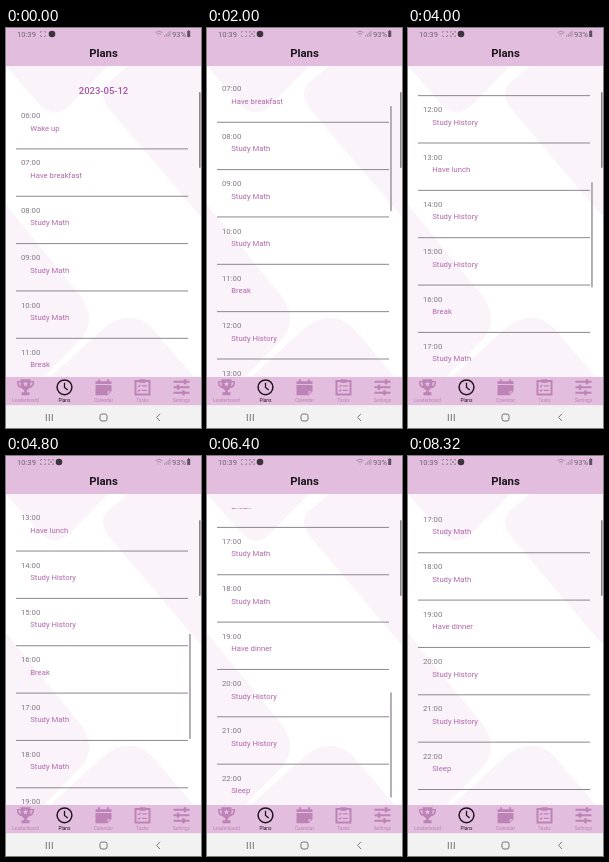
An HTML page that plays this animation: 195 by 400 pixels, repeating every 8.4 s.

```html
<!DOCTYPE html>
<html lang="en">
<head>
<meta charset="utf-8">
<title>Plans</title>
<style>
html, body { margin: 0; width: 100%; height: 100%; overflow: hidden; background: #fff; }
svg { display: block; width: 100%; height: 100%; font-family: Roboto, Arial, sans-serif; }
.bar { fill: #e2bddd; }
.blob { fill: #faf3fa; }
.time { font-size: 7.75px; fill: #807882; }
.task { font-size: 7.7px; fill: #b066a9; }
.rule { stroke: #8d868f; stroke-width: 1; }
.tab { fill: #bd83b7; stroke: none; color: #bd83b7; }
.tab.on { fill: #1c151c; color: #1c151c; }
.tab text { font-size: 4.8px; text-anchor: middle; }
.line { fill: none; stroke: currentColor; }
.status { fill: #6d6070; font-size: 7.6px; }
.thin { fill: none; stroke: #8d7a8d; stroke-width: .7; }
.nav { fill: none; stroke: #777; stroke-width: 1; }
</style>
</head>
<body>
<svg viewBox="0 0 195 400" preserveAspectRatio="none">
  <defs>
    <clipPath id="view"><rect x="0" y="52" width="195" height="297"/></clipPath>
    <clipPath id="page"><rect x="0" y="38" width="195" height="311"/></clipPath>
  </defs>
  <rect width="195" height="400" fill="#fff"/>
  <g class="blob" clip-path="url(#page)">
    <path d="M0 38H102L64 77Q49 92 34 77L0 38Z"/>
    <path d="M122 38H195V189L104 82Q90 65 104 53Z"/>
    <path d="M0 177L76 270Q90 292 76 310L38 349H0Z"/>
    <path d="M44 349L98 300Q123 280 145 299L188 349Z"/>
  </g>

  <g clip-path="url(#view)"><g id="list">
    <text x="97.5" y="65.9" text-anchor="middle" font-size="9.5" font-weight="500" fill="#a455a3">2023-05-12</text>
  </g></g>
  <rect id="thumb" x="183" y="52" width="1.9" height="105" fill="#b0abb1"/>
  <rect x="193" y="64" width="1.6" height="76" rx=".8" fill="#8a858c"/>

  <rect class="bar" width="195" height="38"/>
  <text x="97.5" y="28.6" text-anchor="middle" font-size="11.4" font-weight="700" fill="#1c151c">Plans</text>
  <text class="status" x="11" y="8.7">10:39</text>
  <g class="thin">
    <path d="M34.5 5V3.5H36M38 3.5H39.5V5M39.5 7V8.5H38M36 8.5H34.5V7"/>
    <path id="extra" d="M42.5 5V3.5H44M46 3.5H47.5V5M47.5 7V8.5H46M44 8.5H42.5V7M44 5L46 7M46 5L44 7"/>
    <path d="M149.5 4.6Q153 1.8 156.5 4.6M151 6.3Q153 4.7 155 6.3M153 7.8V8.4M158.5 8.8V7.4M160.3 8.8V5.8M162.1 8.8V4.2M163.9 8.8V2.8"/>
  </g>
  <circle id="dot" cx="46" cy="6" r="3.3" fill="#3a333a"/>
  <text class="status" x="166" y="8.7">93%</text>
  <path d="M181.2 3H182V2.2H183.4V3H184.2V9H181.2Z" fill="#5d5060"/>

  <rect class="bar" y="349" width="195" height="28.5"/>
  <g id="tabs"></g>
  <rect y="377.5" width="195" height="22.5" fill="#f2f2f2"/>
  <path class="nav" d="M40.3 386V393M43.3 386V393M46.3 386V393M154 385.8L150.6 389.4L154 393"/>
  <rect class="nav" x="94" y="386" width="7" height="7" rx="2"/>
</svg>
<script>
const $ = id => document.getElementById(id);
const LOOP = 8400, STEP = 80, ROW = 47.35, TOP = 52, VIEW = 297, MAX = 545;

const tasks = ["Wake up", "Have breakfast", "Study Math", "Study Math", "Study Math", "Break",
  "Study History", "Have lunch", "Study History", "Study History", "Break", "Study Math",
  "Study Math", "Have dinner", "Study History", "Study History", "Sleep"];

$("list").innerHTML += tasks.map((task, i) => {
  const y = 87.4 + i * ROW, hour = String(i + 6).padStart(2, "0");
  return `<text class="time" x="15" y="${y + 2.7}">${hour}:00</text>
    <text class="task" x="24.3" y="${y + 15.2}">${task}</text>
    <path class="rule" d="M10 ${y + 33.5}H182"/>`;
}).join("");

// Icons are drawn around their own centre.
const tabs = [
  ["Leaderboard", `<path d="M-5-8H5V-6.4H8.5V-4Q8 .3 3.6 1Q2.7 2.5 1.3 3V5H4V8H-4V5H-1.3V3Q-2.7 2.5-3.6 1Q-8 .3-8.5-4V-6.4H-5ZM-7-5V-4Q-6.7-1.9-4.5-1Q-5-3-5-5ZM7-5H5Q5-3 4.5-1Q6.7-1.9 7-4ZM0-6.2L-.8-4.4L-2.6-4.2L-1.3-2.9L-1.6-1L0-1.9L1.6-1L1.3-2.9L2.6-4.2L.8-4.4Z" fill-rule="evenodd"/>`],
  ["Plans", `<circle class="line" r="7.4" stroke-width="1.5"/><path class="line" d="M0-4.6V.2L3.2 2.8" stroke-width="1.3"/>`],
  ["Calendar", `<path d="M-8-6H-5.5V-8H-3.7V-6H3.7V-8H5.5V-6H8V-3.2H-8ZM-8-2.2H8V4L4.2 8H-8ZM4 4V7L7 4Z" fill-rule="evenodd"/>`],
  ["Tasks", `<path class="line" d="M-7-6.3H7V7.2H-7Z" stroke-width="2"/><path d="M-3-8H3V-4.5H-3Z"/><path class="line" d="M-4.5-1.5L-3.6-.6L-2.2-2.4M-4.5 3L-3.6 3.9L-2.2 2.1M-.8-1.4H4.5M-.8 3H4.5" stroke-width="1.2"/>`],
  ["Settings", `<path class="line" d="M-8-5.5H8M-8 0H8M-8 5.5H8" stroke-width="1.9"/><path class="line" d="M3.5-8V-3M-3.5-2.5V2.5M2 3V8" stroke-width="2.4"/>`]
];
$("tabs").innerHTML = tabs.map(([name, icon], i) =>
  `<g class="tab${i === 1 ? " on" : ""}" transform="translate(${19.5 + i * 39} 359.3)">${icon}<text y="15.2">${name}</text></g>`
).join("");

// Swipes: time in ms, scroll offset in px
const path = [[0, 0], [960, 0], [1800, 70], [1920, 70], [2000, 74], [2700, 158], [2840, 160],
  [3200, 218], [3520, 254], [3760, 254], [4000, 290], [4560, 350], [4640, 350], [5520, 440],
  [5600, 441], [5680, 452], [6400, 523], [6480, 523], [6900, MAX], [LOOP, MAX]];

const rate = i => (path[i + 1][1] - path[i][1]) / (path[i + 1][0] - path[i][0]);
function slope(i) {
  if (i === 0 || i === path.length - 1) return 0;
  const a = rate(i - 1), b = rate(i);
  return a * b > 0 ? 2 * a * b / (a + b) : 0;
}

// Monotone cubic through the swipe points
function scrollAt(t) {
  let i = 0;
  while (t >= path[i + 1][0]) i++;
  const [t0, s0] = path[i], [t1, s1] = path[i + 1];
  const d = t1 - t0, u = (t - t0) / d, v = 1 - u;
  return s0 * v * v * (1 + 2 * u) + s1 * u * u * (3 - 2 * u)
    + d * (slope(i) * u * v * v - slope(i + 1) * u * u * v);
}

const clamp = x => Math.max(0, Math.min(1, x));

function draw(t) {
  const s = scrollAt(t);
  $("list").setAttribute("transform", `translate(0 ${-s})`);
  $("thumb").setAttribute("y", TOP + s * VIEW / (VIEW + MAX));
  $("thumb").setAttribute("opacity", t < 960 ? 0 : clamp((7600 - t) / 240));
  const late = t >= 400;
  $("extra").setAttribute("opacity", late ? 1 : 0);
  $("dot").setAttribute("cx", late ? 53 : 46);
}

const start = performance.now();
function tick() {
  const t = (performance.now() - start) % LOOP;
  draw(Math.floor(t / STEP) * STEP);
  requestAnimationFrame(tick);
}
tick();
</script>
</body>
</html>
```
